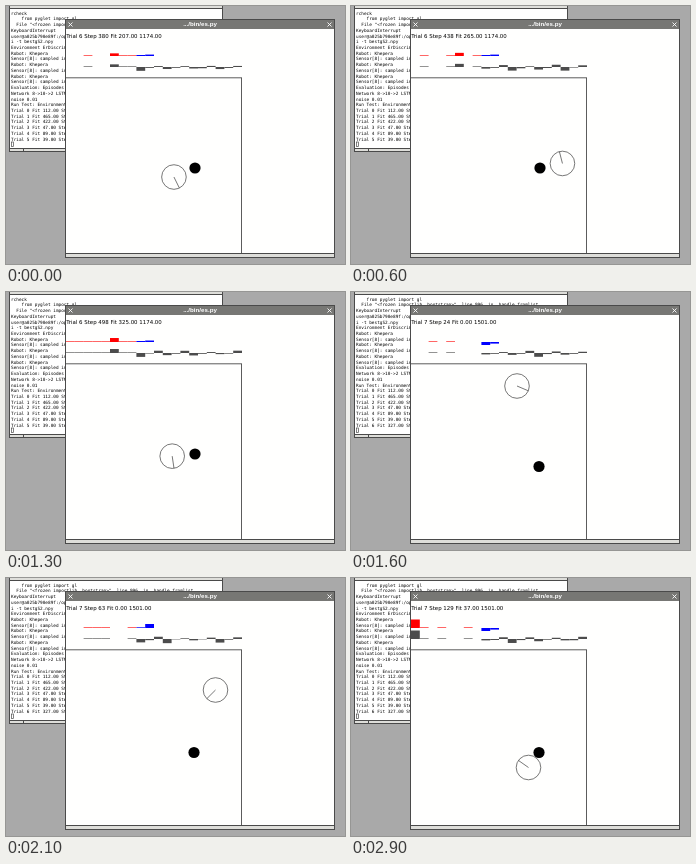
These frames come from a looping animation (339x258 px, 3 s). An HTML page with a canvas:

```html
<!DOCTYPE html>
<html>
<head>
<meta charset="utf-8">
<style>
html, body { margin: 0; width: 100%; height: 100%; overflow: hidden; background: #a9a9a9; }
canvas { display: block; }
</style>
</head>
<body>
<canvas id="stage" width="339" height="258"></canvas>
<script>
const ctx = document.getElementById('stage').getContext('2d');
const LOOP = 3000, TICK = 100, RESET_TICK = 14;
const LEFT = 60, CELL = 8.8, EDGE = '#4a4a4a';

const SENSORS = Array(3).fill(['Robot: Khepera', 'Sensor[8]: sampled inf']).flat();
const LOG = [
  'rcheck',
  '    from pyglet import gl',
  '  File "<frozen importlib._bootstrap>", line 996, in _handle_fromlist',
  'KeyboardInterrupt',
  'user@a025b790e89f:/opt',
  'i -t bestgS2.npy',
  'Environment ErDiscrim',
  ...SENSORS,
  'Evaluation: Episodes',
  'Network 8->10->2 LSTM',
  'noise 0.01',
  'Run Test: Environment',
  ...[112, 465, 422, 47, 89, 39, 327].map((fit, i) => `Trial ${i} Fit ${fit}.00 Step`)
];

// [tick, step]
const STEPS = {
  6: [[0, 380], [6, 438], [10, 472]],
  7: [[16, 24], [21, 63], [24, 89], [29, 129]]
};

// [step, x, y, heading in degrees]
const APPROACH = [
  [24, 166, 94, -23], [63, 209.5, 112, 225], [89, 183.5, 140, 415],
  [109, 170, 164, 458], [129, 177.5, 189.5, 505]
];

const radians = degrees => degrees * Math.PI / 180;
const lerp = (a, b, p) => a + (b - a) * p;
const clamp01 = v => Math.min(1, Math.max(0, v));

// Linear between key points, extended past the last one.
function sample(keys, at) {
  let i = 0;
  while (i < keys.length - 2 && keys[i + 1][0] <= at) i++;
  const [a, b] = [keys[i], keys[i + 1]];
  const p = (at - a[0]) / (b[0] - a[0]);
  return a.map((v, j) => lerp(v, b[j], p));
}

function noise(a, b) {
  const v = Math.sin(a * 12.9898 + b * 78.233 + 1) * 43758.5453;
  return v - Math.floor(v);
}

function rect(x, y, w, h, color) {
  ctx.fillStyle = color;
  ctx.fillRect(x, y, w, h);
}

function line(x1, y1, x2, y2, color = EDGE, width = 1) {
  ctx.strokeStyle = color;
  ctx.lineWidth = width;
  ctx.beginPath();
  ctx.moveTo(x1, y1);
  ctx.lineTo(x2, y2);
  ctx.stroke();
}

function text(str, x, y, font, color = '#000', align = 'left') {
  ctx.font = font;
  ctx.fillStyle = color;
  ctx.textAlign = align;
  ctx.fillText(str, x, y);
}

function frame(x, y, w, h, width = 1) {
  ctx.strokeStyle = EDGE;
  ctx.lineWidth = width;
  ctx.strokeRect(x + .5, y + .5, w - 1, h - 1);
}

function drawTerminal(scrolled) {
  rect(3, 0, 214, 146, '#dededa');
  rect(4, 3, 212, 139, '#fff');
  frame(3, -5, 214, 151);
  line(4, 2.5, 216, 2.5);
  line(4, 142.5, 216, 142.5);
  line(17.5, 143, 17.5, 146);
  const first = scrolled ? 1 : 0;
  LOG.slice(first, first + 23).forEach((row, i) => {
    text(row, 5, 8.7 + i * 5.72, '4.4px "DejaVu Sans Mono", monospace');
  });
  frame(5, 135.5, 3, 5.4, .7);
}

function drawCross(x, y) {
  line(x - 2, y - 2, x + 2, y + 2, '#fff', .9);
  line(x - 2, y + 2, x + 2, y - 2, '#fff', .9);
}

function drawWindow() {
  rect(59, 14, 269, 238, '#fffffe');
  rect(60, 14, 268, 9, '#777774');
  rect(60, 248, 268, 3, '#dededa');
  line(60, 247.5, 328, 247.5);
  frame(59, 13, 270, 239);
  drawCross(64.5, 18.5);
  drawCross(323.5, 18.5);
  text('.../bin/es.py', 194, 20.4, 'bold 6.2px "Liberation Sans", sans-serif', '#fff', 'center');
  line(60, 71.8, 236, 71.8, EDGE, .9);
  line(235.5, 72, 235.5, 247, EDGE, .9);
}

function motors(trial, step) {
  const turn = Math.exp(-(((step - 63) / 12) ** 2));
  return trial === 6
    ? [1, 2.6 + 1.2 * Math.sin(step / 9)]
    : [lerp(-3, .7, turn), lerp(-1.6, 4, turn)];
}

// Faint flickering readings, plus the cell that faces the ball.
function sensor(i, trial, tick, step) {
  if (trial === 6 && i === 5) return 2 + 2 * noise(tick, i);
  if (trial === 7 && i === 0) return 8.5 * clamp01((step - 100) / 25);
  return noise(tick, i) < .45 ? .6 : 0;
}

function hiddenUnit(i, tick) {
  const bias = [-.9, 1.6, -2.8][i % 3];
  return bias * (.4 + 1.1 * noise(tick, i));
}

function drawBars(trial, tick, step) {
  const bar = (i, base, height, color) => rect(LEFT + i * CELL, base, CELL, -height, color);
  for (let i = 0; i < 8; i++) {
    const value = sensor(i, trial, tick, step);
    bar(i, 50, value, '#f00');
    bar(i, 61, value, '#4c4c4c');
  }
  motors(trial, step).forEach((value, i) => bar(8 + i, 50, value, '#00f'));
  for (let i = 8; i < 20; i++) bar(i, 61, hiddenUnit(i, tick), '#4c4c4c');
}

function robotPose(trial, step) {
  if (trial === 7) return sample(APPROACH, step).slice(1);
  const angle = 203.2 + 2.9 * (step - 380), rad = radians(angle);
  return [189 + 22.9 * Math.cos(rad), 162 - 22.9 * Math.sin(rad), angle + 93];
}

function drawArena(trial, step) {
  const ball = trial === 6 ? [189, 162] : [188, 174.5];
  ctx.fillStyle = '#000';
  ctx.beginPath();
  ctx.arc(...ball, 5.6, 0, 2 * Math.PI);
  ctx.fill();

  const [x, y, heading] = robotPose(trial, step), rad = radians(heading);
  line(x, y, x + 12.3 * Math.cos(rad), y - 12.3 * Math.sin(rad), EDGE, .75);
  ctx.beginPath();
  ctx.arc(x, y, 12.3, 0, 2 * Math.PI);
  ctx.stroke();
}

function draw(now) {
  const tick = Math.floor((now % LOOP) / TICK);
  const trial = tick < RESET_TICK ? 6 : 7;
  const step = Math.round(sample(STEPS[trial], tick)[1]);
  const fit = trial === 6 ? step - 173 : Math.max(0, step - 92);
  const total = trial === 6 ? 1174 : 1501;

  rect(0, 0, 339, 258, '#a9a9a9');
  drawTerminal(trial === 7);
  drawWindow();
  text(`Trial ${trial} Step ${step} Fit ${fit}.00 ${total}.00`, 60.2, 32.2, '5.45px "DejaVu Sans", sans-serif');
  drawBars(trial, tick, step);
  drawArena(trial, step);
}

const start = performance.now();
function loop() {
  draw(performance.now() - start);
  requestAnimationFrame(loop);
}
loop();
</script>
</body>
</html>
```
